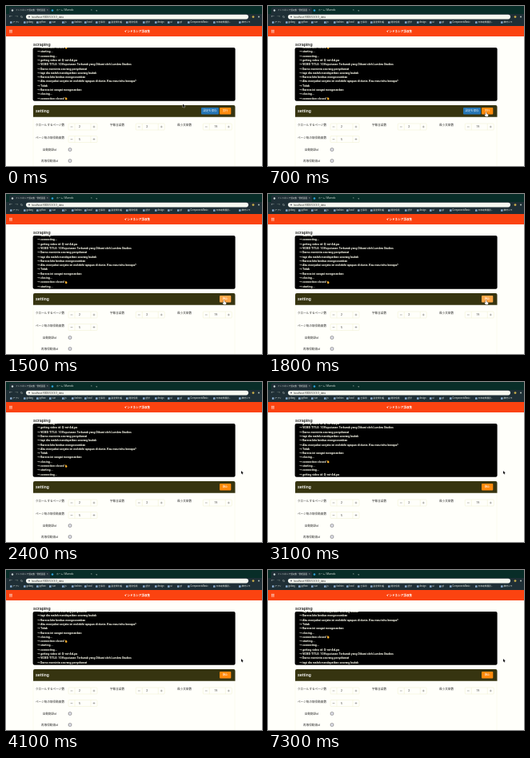
These frames come from a looping animation (320 by 200 pixels, 8000 ms). An HTML page with a canvas:

```html
<!DOCTYPE html>
<html lang="ja">
<head>
<meta charset="utf-8">
<title>scraping</title>
<style>
html, body { margin: 0; width: 100%; height: 100%; overflow: hidden; background: #fffffa; }
canvas { display: block; width: 320px; height: 200px; }
</style>
</head>
<body>
<canvas id="stage"></canvas>
<script>
const LOOP = 8000;
const canvas = document.getElementById('stage');
const ctx = canvas.getContext('2d');
const dpr = Math.max(1, window.devicePixelRatio || 1);
canvas.width = 320 * dpr;
canvas.height = 200 * dpr;

const script = [
  'starting...',
  'connecting...',
  'getting video id: Q-mt-4xLpa',
  'VIDEO TITLE: 10 Keputusan Terburuk yang Dibuat oleh Lumbra Studios',
  'Darno meminta seorang penyelamat',
  'tapi dia malah mendapatkan seorang budak',
  'Karena kita berdua mengecewakan',
  'Aku menyukai senjata ini melebihi apapun di dunia. Kau mau tahu kenapa?',
  'Tidak',
  'Karena ini sangat mengesankan',
  'closing...',
  'connection closed'
];
const lineTimes = [1400, 2300, 3100, 3400, 3800, 7300];
const TOOLBAR = '#1f2f36';
const PAGE = '#fffffa';

// time, x, y, pointer shape
const cursorKeys = [
  [0, 221, 122.5, 'arrow'], [100, 255, 130, 'arrow'], [300, 272, 133, 'hand'],
  [2100, 278, 130, 'arrow'], [2200, 285, 124, 'arrow'],
  [2300, 291, 116, 'arrow'], [2400, 294, 111, 'arrow']
];

function box(x, y, w, h, color, r = 0) {
  ctx.fillStyle = color;
  ctx.beginPath();
  ctx.roundRect(x, y, w, h, r);
  ctx.fill();
}

function line(x1, y1, x2, y2, color, width = 0.5) {
  ctx.strokeStyle = color;
  ctx.lineWidth = width;
  ctx.beginPath();
  ctx.moveTo(x1, y1);
  ctx.lineTo(x2, y2);
  ctx.stroke();
}

function dot(x, y, r, color) {
  ctx.fillStyle = color;
  ctx.beginPath();
  ctx.arc(x, y, r, 0, Math.PI * 2);
  ctx.fill();
}

// Text is laid out ten times larger so that tiny sizes keep exact spacing.
function text(s, x, y, size, color, weight = 400, align = 'left') {
  ctx.save();
  ctx.translate(x, y);
  ctx.scale(0.1, 0.1);
  ctx.font = `${weight} ${size * 10}px Roboto, "Noto Sans CJK JP", "Noto Sans CJK", sans-serif`;
  ctx.textAlign = align;
  ctx.textBaseline = 'middle';
  ctx.fillStyle = color;
  ctx.fillText(s, 0, 0);
  const width = ctx.measureText(s).width / 10;
  ctx.restore();
  return width;
}

function browser() {
  box(0, 0, 320, 10, '#082d28');
  box(0, 10, 320, 15, TOOLBAR);
  box(4, 1.5, 51, 8.5, TOOLBAR, [2, 2, 0, 0]);
  dot(8, 5.5, 1.2, '#c9d4d4');
  text('インドネシア語収集 - 管理画面', 12, 5.6, 2.7, '#dfe6e0');
  text('×', 51, 5.5, 3, '#c5cec8');
  dot(58, 5.5, 1.3, '#2ba0d8');
  text('ホーム / Murmelo', 63, 5.6, 2.7, '#dfe6e0');
  text('×', 106, 5.5, 3, '#c5cec8');
  text('+', 112, 5.5, 4, '#c5cec8');

  text('←', 4, 13.5, 4, '#cdd6d0');
  text('→', 11, 13.5, 4, '#8b9990');
  text('↻', 18, 13.5, 4, '#cdd6d0');
  box(25, 10.8, 278, 5.6, '#f6f8f0', 2.8);
  dot(29, 13.6, 1, '#667');
  text('localhost:9000/53/3/3_data', 32, 13.8, 3.2, '#333');
  dot(309, 13.6, 1.4, '#c9ae4a');
  dot(316, 13.6, 1, '#b5c2ba');

  const marks = [
    [5, 'アプリ'], [22, 'golang'], [38, 'python'], [54, 'vue'], [70, 'js'],
    [82, 'fashion'], [98, 'local'], [112, '仕事用'], [128, '副業便利帳'],
    [150, '開発環境'], [171, '語学'], [186, 'design'], [202, 'ui'],
    [214, 'qt'], [227, 'ComponentsBasic'], [259, '日本映像翻訳…'], [291, '教材メモ']
  ];
  for (const [x, label] of marks) {
    box(x, 19.3, 2.6, 2.4, '#87a9cc', 0.5);
    text(label, x + 3.6, 20.7, 2.7, '#e4ebe4');
  }
}

function header() {
  box(0, 25, 320, 13, '#fb4310');
  [30.3, 31.7, 33.1].forEach(y => line(4, y, 8, y, '#fff', 0.6));
  text('インドネシア語収集', 164, 31.7, 3.6, '#fff', 700, 'center');
}

function log(t) {
  const added = lineTimes.filter(at => t >= at).length;
  text('scraping', 34, 48, 5.6, '#222', 500);
  ctx.save();
  ctx.beginPath();
  ctx.roundRect(33.6, 52, 253, 66.8, 2);
  ctx.fillStyle = '#000';
  ctx.fill();
  ctx.clip();
  for (let row = -1; row < 12; row++) {
    const entry = script[(row + added + 12) % 12];
    const y = 57.2 + row * 5.32;
    text('→', 38.8, y, 3.58, '#fffff0', 700);
    const width = text(entry, 43, y, 3.58, '#fffff0', 700);
    if (entry === 'connection closed') wave(44 + width, y);
  }
  ctx.restore();
}

function wave(x, y) {
  box(x + 0.6, y - 0.7, 2.4, 2.3, '#ffb52e', 1);
  for (let i = 0; i < 3; i++) {
    line(x + 1 + i * 0.6, y, x + 0.2 + i * 0.8, y - 1.5, '#ffb52e', 0.6);
  }
}

function stepper(x, y, value, gap = 9) {
  ctx.strokeStyle = '#eaeac4';
  ctx.lineWidth = 0.4;
  ctx.beginPath();
  ctx.roundRect(x, y - 4, 36, 8, 1);
  ctx.stroke();
  line(x + 8, y - 4, x + 8, y + 4, '#eaeac4', 0.4);
  line(x + 28, y - 4, x + 28, y + 4, '#eaeac4', 0.4);
  line(x + 2.6, y, x + 5.4, y, '#777');
  line(x + 30.6, y, x + 33.4, y, '#777');
  line(x + 32, y - 1.4, x + 32, y + 1.4, '#777');
  text(value, x + 5 + gap, y + 0.2, 3.6, '#444', 400, 'center');
}

function checkbox(x, y) {
  box(x - 1.8, y - 1.8, 3.6, 3.6, '#e2e2ec', 1);
  ctx.strokeStyle = '#666';
  ctx.lineWidth = 0.6;
  ctx.stroke();
}

function buttons(t) {
  const running = t >= 1400;
  if (!running) {
    box(244, 127, 22, 8.4, '#2474b4', 1);
    text('設定を保存', 255, 131.3, 3.4, '#e4f0fa', 500, 'center');
  }
  const lit = running && t < 2100;
  box(267, 127, 14.3, 8.4, lit ? '#ffa647' : '#ff8a0c', 1);
  text(running ? '停止' : '実行', 274.1, 131.3, 3.4, '#fff', 500, 'center');
}

function settings(t) {
  box(34, 124, 252.5, 14.7, '#363410', [2, 2, 0, 0]);
  text('setting', 37, 131.4, 5.4, '#fff', 500);
  buttons(t);
  line(34, 139, 34, 200, '#f2f2dc', 0.4);
  line(286, 139, 286, 200, '#f2f2dc', 0.4);
  const labels = [
    ['クロールするページ数', 55, 149], ['字幕言語数', 139, 149],
    ['最小文章数', 223, 149], ['ページ毎の取得動画数', 55, 165],
    ['自動翻訳id', 54.5, 180], ['再取得動画id', 54.5, 194]
  ];
  labels.forEach(([s, x, y]) => text(s, x, y, 3.6, '#333', 400, 'center'));
  stepper(78, 151, '2');
  stepper(162.3, 151, '2');
  stepper(246.3, 151, '19', 11);
  stepper(78, 166.5, '5');
  checkbox(80, 179.5);
  checkbox(80, 193.5);
}

function cursor(t) {
  const [, x, y, shape] = cursorKeys.findLast(key => t >= key[0]);
  const hand = shape === 'hand';
  const path = new Path2D(hand
    ? 'M0 0 Q.7-.6 1.2 .2 V2 L3.3 2.6 V4.2 L2.7 5.2 H.2 L-1.5 3 L-.9 2.5 L0 3.2 Z'
    : 'M0 0 V4 L.9 3.1 L1.6 4.6 L2.3 4.3 L1.6 2.8 H2.8 Z');
  ctx.save();
  ctx.translate(x, y);
  ctx.lineWidth = 0.5;
  ctx.strokeStyle = hand ? '#111' : '#fff';
  ctx.fillStyle = hand ? '#fff' : '#111';
  ctx.stroke(path);
  ctx.fill(path);
  ctx.restore();
}

function draw(t) {
  ctx.setTransform(dpr, 0, 0, dpr, 0, 0);
  box(0, 0, 320, 200, PAGE);
  browser();
  header();
  log(t);
  settings(t);
  cursor(t);
}

const start = performance.now();
function tick() {
  draw((performance.now() - start) % LOOP);
  requestAnimationFrame(tick);
}
tick();
</script>
</body>
</html>
```
